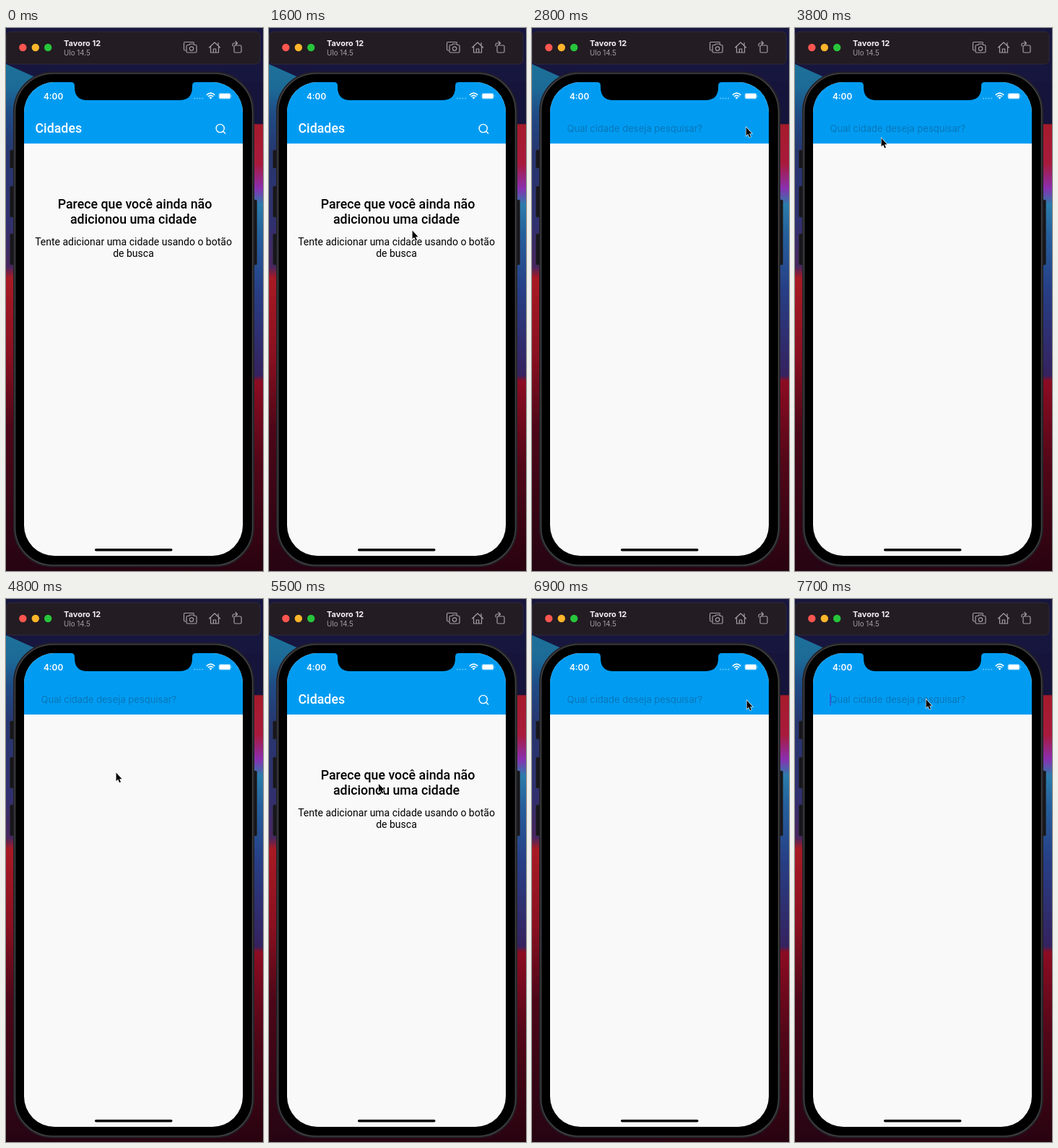
An HTML page that plays this animation: 356 px wide and 752 px high, repeating every 8000 ms.

```html
<!DOCTYPE html>
<html lang="pt">
<head>
<meta charset="utf-8">
<style>
html, body { margin: 0; width: 100%; height: 100%; overflow: hidden; background: #14102a; }
svg { display: block; width: 356px; height: 752px; }
text { font-family: Roboto, sans-serif; }
.ui { font-family: Inter, sans-serif; }
.title { font-size: 17.8px; font-weight: 500; }
.body { font-size: 14px; }
.mid { text-anchor: middle; }
.line { fill: none; stroke-linecap: round; stroke-linejoin: round; }
</style>
</head>
<body>
<svg viewBox="0 0 356 752">
  <defs>
    <linearGradient id="left" x2="0" y2="1">
      <stop offset=".06" stop-color="#1d7399"/>
      <stop offset=".11" stop-color="#1c6a97"/>
      <stop offset=".16" stop-color="#1f4b85"/>
      <stop offset=".23" stop-color="#27366f"/>
      <stop offset=".36" stop-color="#30306f"/>
      <stop offset=".44" stop-color="#49265e"/>
      <stop offset=".46" stop-color="#a81a24"/>
      <stop offset=".6" stop-color="#8a1020"/>
      <stop offset=".74" stop-color="#4c0718"/>
      <stop offset="1" stop-color="#260412"/>
    </linearGradient>
    <linearGradient id="right" x2="0" y2="1">
      <stop offset="0" stop-color="#17143c"/>
      <stop offset=".176" stop-color="#15143a"/>
      <stop offset=".178" stop-color="#a51b2b"/>
      <stop offset=".25" stop-color="#a81a3c"/>
      <stop offset=".295" stop-color="#8a2fb0"/>
      <stop offset=".325" stop-color="#2b7dab"/>
      <stop offset=".38" stop-color="#25609d"/>
      <stop offset=".48" stop-color="#273f86"/>
      <stop offset=".64" stop-color="#35225f"/>
      <stop offset=".65" stop-color="#8c0c22"/>
      <stop offset=".8" stop-color="#530718"/>
      <stop offset="1" stop-color="#280310"/>
    </linearGradient>
    <clipPath id="screen"><rect x="25" y="75" width="303" height="656" rx="42"/></clipPath>
  </defs>

  <rect width="178" height="752" fill="url(#left)"/>
  <rect x="178" width="178" height="752" fill="url(#right)"/>
  <path d="M0 0H356V75H56L0 50Z" fill="#17163f"/>

  <rect x=".5" y="5" width="351.5" height="45" rx="6" fill="#231c22" stroke="#39313a" stroke-width=".7"/>
  <circle cx="23.3" cy="27" r="5.2" fill="#fc5650"/>
  <circle cx="40.8" cy="27" r="5.2" fill="#fdb52b"/>
  <circle cx="58.2" cy="27" r="5.2" fill="#27c53b"/>
  <text class="ui" x="80" y="25" font-size="11" font-weight="700" fill="#f4f0f3">Tavoro 12</text>
  <text class="ui" x="80" y="37.5" font-size="9.8" fill="#a49da3">Ulo 14.5</text>
  <g class="line" stroke="#a59ea5" stroke-width="1.2">
    <path d="M249 31H248Q246.5 31 246.5 29.5V21Q246.5 19.5 248 19.5H259Q260.5 19.5 260.5 21"/>
    <path d="M251.5 23.5H253.5L255 22H259.5L261 23.5H262.5Q264 23.5 264 25V32.5Q264 34 262.5 34H251.5Q250 34 250 32.5V25Q250 23.5 251.5 23.5Z"/>
    <circle cx="257" cy="28.6" r="2.7"/>
    <path d="M281.5 27L289 20L296.5 27M283.5 25.5V34H294.5V25.5M294 24V20.5M287.3 34V29H290.7V34"/>
    <rect x="316" y="24" width="10" height="10" rx="1.5"/>
    <path d="M314 25V23Q314 21 316 21H320M318 18.5L320.5 21L318 23.5"/>
  </g>

  <g fill="#17171b" stroke="#2b2b32" stroke-width=".6">
    <rect x="5.5" y="169" width="6" height="25" rx="1.5"/>
    <rect x="5.5" y="219" width="6" height="43" rx="1.5"/>
    <rect x="5.5" y="285" width="6" height="43" rx="1.5"/>
    <rect x="341.5" y="238" width="6" height="90" rx="1.5"/>
  </g>
  <rect x="11" y="61.5" width="332" height="684" rx="54" stroke="#222226" stroke-width="2"/>
  <rect x="12.5" y="63" width="329" height="681" rx="52.5" fill="none" stroke="#424246" stroke-width="1.5"/>

  <g clip-path="url(#screen)">
    <rect x="25" y="75" width="303" height="656" fill="#f9f9f9"/>
    <rect x="25" y="75" width="303" height="85" fill="#019cf2"/>
    <path d="M90 74V75Q95 75 95 80V82Q95 100 113 100H240Q258 100 258 82V80Q258 75 263 75V74Z"/>
  </g>
  <text class="ui" x="52" y="98.5" font-size="11.8" font-weight="600" fill="#fff">4:00</text>
  <g fill="#fff">
    <path d="M260 97.5h2m1.7 0h2m1.7 0h2m1.7 0h2" stroke="#fff" stroke-width="1.6" opacity=".4"/>
    <path d="M281.4 96.3Q283.5 94.6 285.6 96.3L283.5 98.5Z"/>
    <path class="line" style="stroke-linecap:butt" d="M277.8 92.8Q283.5 87.6 289.2 92.8M279.9 95Q283.5 91.7 287.1 95" stroke="#fff" stroke-width="1.6"/>
    <rect x="294.5" y="90" width="17" height="8.5" rx="2.5" opacity=".4"/>
    <rect x="295.5" y="91" width="15" height="6.5" rx="1.6"/>
    <path d="M312.3 92.7Q314 94.2 312.3 95.8Z" opacity=".6"/>
  </g>
  <rect x="123" y="721" width="107.5" height="3.6" rx="1.8"/>

  <g id="home">
    <text class="title" x="40.5" y="145" fill="#fff">Cidades</text>
    <path class="line" d="M302.3 139A5.6 5.6 0 1 1 291.1 139A5.6 5.6 0 1 1 302.3 139M300.8 143L303.6 145.9" stroke="#fff" stroke-width="1.4"/>
    <g class="mid">
      <text class="title" x="178.5" y="250">Parece que você ainda não</text>
      <text class="title" x="176.5" y="270.5">adicionou uma cidade</text>
      <text class="body" x="176.5" y="300.5">Tente adicionar uma cidade usando o botão</text>
      <text class="body" x="176.5" y="317">de busca</text>
    </g>
  </g>
  <g id="search">
    <text class="ui" x="48.5" y="144" font-size="13" fill="#0876b7">Qual cidade deseja pesquisar?</text>
    <rect id="caret" x="48.3" y="131" width="1.6" height="17" fill="#3d4fd6"/>
  </g>
  <path id="pointer" d="M.6 .6V12.2L3.2 9.8L5.1 14.2L7 13.4L5.1 9.2H8.6Z" stroke="#fff" stroke-width="1.2" paint-order="stroke"/>
</svg>
<script>
const LOOP = 8000, STEP = 100;
// Pointer waypoints: time, x, y
const path = [
  [900, 345, 686], [1100, 304, 648], [1200, 243, 600], [1400, 181, 365], [1600, 198, 280],
  [1800, 202, 302], [2100, 262, 205], [2400, 296, 137],
  [3400, 296, 137], [3600, 215, 190], [3800, 119, 152], [4000, 235, 130], [4100, 300, 140],
  [4300, 112, 150], [4500, 30, 100], [4600, 60, 150], [4800, 152, 240],
  [5400, 152, 240], [5700, 150, 286], [5800, 150, 286], [6100, 205, 215], [6300, 285, 149],
  [6600, 297, 140], [7100, 297, 140], [7400, 181, 138.5], [8000, 181, 138.5]
];
const el = id => document.getElementById(id);
const [home, search, caret, pointer] = ['home', 'search', 'caret', 'pointer'].map(el);
const show = (node, on) => node.style.display = on ? '' : 'none';

function pointerAt(t) {
  const i = path.findIndex(p => p[0] > t);
  const [t0, x0, y0] = path[i - 1], [t1, x1, y1] = path[i];
  const k = (t - t0) / (t1 - t0);
  return [x0 + (x1 - x0) * k, y0 + (y1 - y0) * k];
}

function draw(now) {
  const t = Math.floor(now % LOOP / STEP) * STEP;
  const searching = t >= 2800 && t < 5400 || t >= 6800;
  const moving = t >= path[0][0];
  show(home, !searching);
  show(search, searching);
  show(caret, t >= 7700);
  show(pointer, moving);
  if (moving) pointer.setAttribute('transform', `translate(${pointerAt(t)})`);
}

const start = performance.now();
function tick() {
  draw(performance.now() - start);
  requestAnimationFrame(tick);
}
tick();
</script>
</body>
</html>
```
